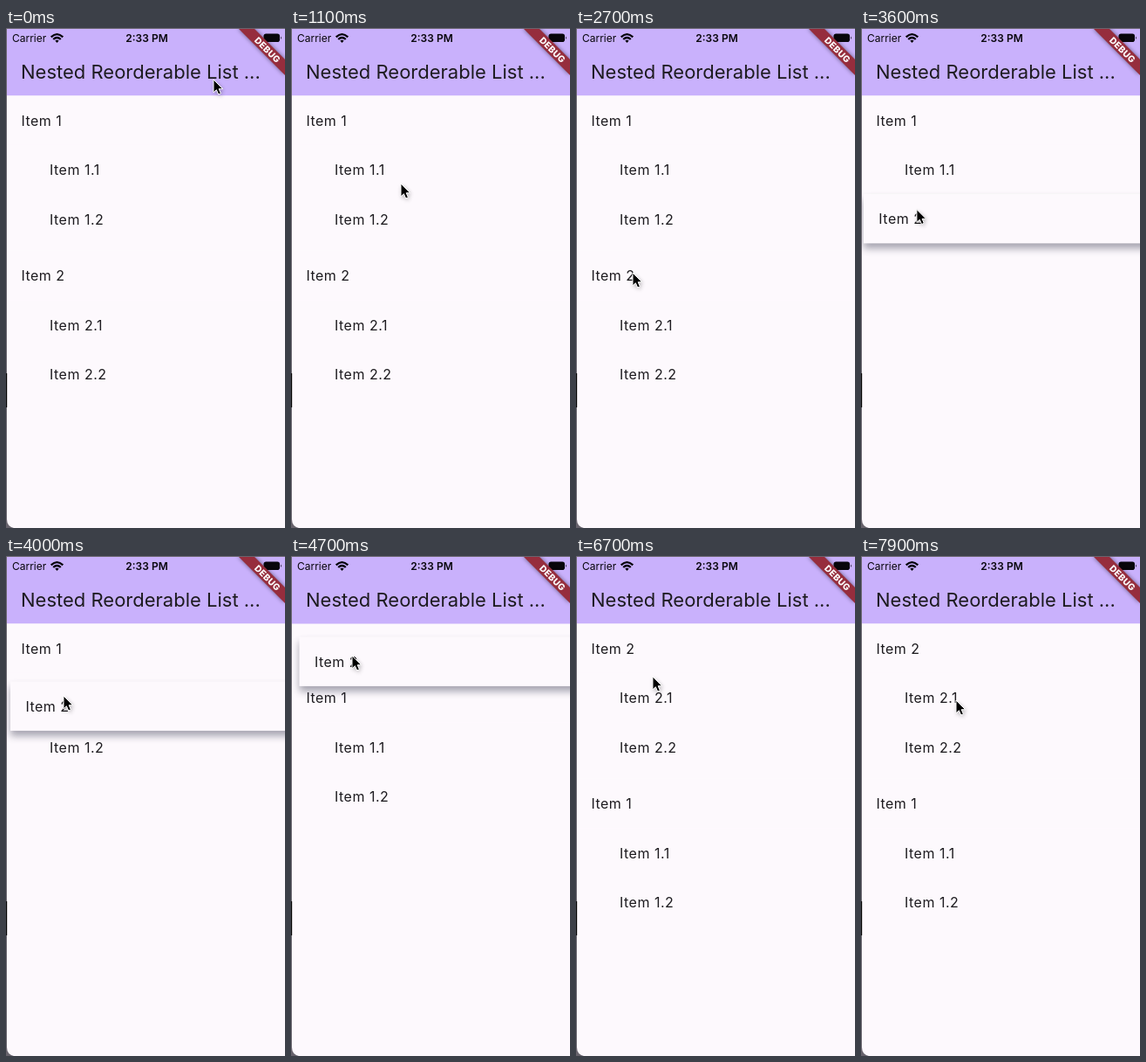
An HTML page for the animation above (8000 ms loop, 320x572 px).

```html
<!DOCTYPE html>
<html lang="en">
<head>
<meta charset="utf-8">
<title>Nested reorderable list</title>
<style>
  html, body { margin: 0; width: 100%; height: 100%; overflow: hidden; background: #fdf9fd; }
  svg { display: block; width: 100vw; height: 100vh; }
  text { font-family: Inter, Roboto, sans-serif; fill: #1d1b1f; }
  .item { font-size: 16px; letter-spacing: .5px; }
  .status { font-size: 12px; fill: #08060c; }
</style>
</head>
<body>
<svg viewBox="0 0 320 572">
  <defs>
    <filter id="soft" x="-10%" y="-50%" width="120%" height="200%"><feGaussianBlur stdDeviation="4"/></filter>
    <filter id="glow" x="-50%" y="-50%" width="200%" height="200%"><feGaussianBlur stdDeviation="2.5"/></filter>
  </defs>
  <rect width="320" height="572" fill="#fdf9fd"/>

  <rect width="320" height="77.5" fill="#c9b1fc"/>
  <text x="17" y="57.5" font-size="22">Nested Reorderable List ...</text>
  <text class="status" x="7" y="16">Carrier</text>
  <text class="status" x="161.5" y="16" text-anchor="middle" font-weight="600">2:33 PM</text>
  <g fill="none" stroke="#08060c" stroke-width="2.3">
    <path d="M51.7 10.3Q58.5 3.9 65.3 10.3M54.2 13Q58.5 9.1 62.8 13"/>
    <path d="M58.5 17L56.3 14.6Q58.5 12.9 60.7 14.6Z" fill="#08060c" stroke="none"/>
  </g>
  <rect x="295.5" y="6.5" width="18.5" height="9.5" rx="2.8" fill="#08060c"/>
  <path d="M315.2 9.5q1.8 1.7 0 3.5z" fill="#08060c"/>

  <g id="list"></g>

  <g>
    <path d="M266 0H284L320 36V54Z" fill="#000" opacity=".5" filter="url(#glow)"/>
    <path d="M266 0H284L320 36V54Z" fill="#962d3d"/>
    <text transform="translate(300 25) rotate(45)" y="3.8" text-anchor="middle" font-size="10.2"
      font-weight="800" letter-spacing=".3" style="fill:#fff">DEBUG</text>
  </g>

  <path d="M0 0H320V1H1V562Q1 570 9 572H0Z" fill="#67636c"/>
  <path d="M0 395H1.2V434H0Z" fill="#000"/>

  <g id="cursor">
    <path d="M1 2V17L4.4 14L6.8 19L9.6 17.8L7.4 12.8H12Z" fill="#000" opacity=".3" filter="url(#glow)"/>
    <path d="M0 0V14.8L3.4 11.7L5.7 17L8.4 15.8L6.2 10.7H10.7Z" fill="#000" stroke="#fff" stroke-width="1"/>
  </g>
</svg>
<script>
const LOOP = 8000, STEP = 100;
const ROW = 56.4, SECTION = 177.4, TOP = 77.5;
const LIFT = 3100, DROP = 4900, SETTLED = 5150;

// [time, x, y]
const POINTER = [
  [0, 238, 59], [700, 128, 176], [1000, 128, 176], [1100, 126, 178],
  [2700, 65, 280], [2800, 61, 275], [3100, 61, 274], [4000, 66, 160],
  [4700, 70, 114], [5800, 70, 115], [7700, 109, 165]
];
const DRAGGED = [
  [LIFT, 0, SECTION], [4000, 5, 66], [4700, 9.5, 15], [DROP, 9.5, 15], [SETTLED, 0, 0]
];

const NS = "http://www.w3.org/2000/svg";
const list = document.getElementById("list");
const cursor = document.getElementById("cursor");

function add(parent, tag, attrs, content = "") {
  const el = document.createElementNS(NS, tag);
  for (const key in attrs) el.setAttribute(key, attrs[key]);
  el.textContent = content;
  return parent.appendChild(el);
}

function makeSection(n) {
  const group = add(list, "g", {});
  const box = { y: TOP, width: 330, height: ROW };
  const shadow = add(group, "rect", { ...box, y: TOP + 6, fill: "#3c3d52", filter: "url(#soft)" });
  add(group, "rect", { ...box, fill: "#fdf9fd" });
  const children = add(group, "g", {});
  const label = (parent, row, x, name) =>
    add(parent, "text", { class: "item", x, y: 111.8 + row * ROW }, name);
  label(group, 0, 17.4, "Item " + n);
  for (const k of [1, 2]) label(children, k, 50, `Item ${n}.${k}`);
  return { group, shadow, children };
}

const first = makeSection(1), second = makeSection(2);
first.shadow.setAttribute("opacity", 0);

const clamp = v => Math.max(0, Math.min(1, v));
const progress = (t, from, to) => clamp((t - from) / (to - from));
const smooth = p => p * p * (3 - 2 * p);

function along(keys, t) {
  let i = 0;
  while (i < keys.length - 2 && t >= keys[i + 1][0]) i++;
  const [t0, x0, y0] = keys[i], [t1, x1, y1] = keys[i + 1];
  const p = smooth(progress(t, t0, t1));
  return [x0 + (x1 - x0) * p, y0 + (y1 - y0) * p];
}

function place(el, [x, y]) {
  el.setAttribute("transform", `translate(${x} ${y})`);
}

function draw(t) {
  const dragging = t >= LIFT && t < SETTLED;
  const gap = ROW * smooth(progress(t, 4050, 4300));
  const lift = progress(t, LIFT, LIFT + 250) * (1 - progress(t, DROP, SETTLED));
  place(first.group, [0, t < SETTLED ? gap : SECTION]);
  place(second.group, along(DRAGGED, t));
  second.shadow.setAttribute("opacity", 0.45 * lift);
  second.children.setAttribute("visibility", dragging ? "hidden" : "visible");
  place(cursor, along(POINTER, t));
}

const start = performance.now();
function tick() {
  const t = (performance.now() - start) % LOOP;
  draw(Math.floor(t / STEP) * STEP);
  requestAnimationFrame(tick);
}
tick();
</script>
</body>
</html>
```
